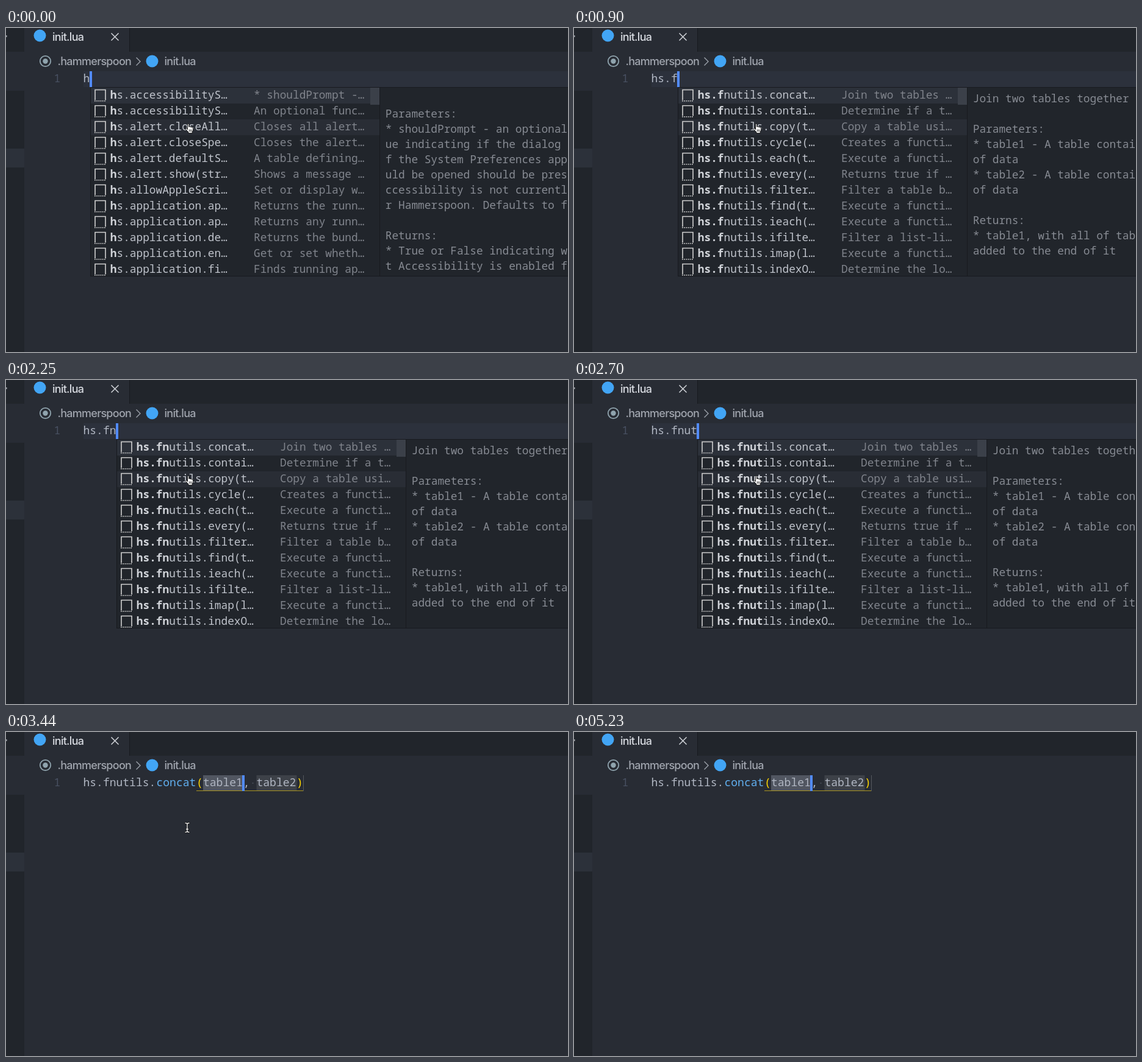
These frames come from a looping animation (921 px wide and 532 px high, 5.38 s). An HTML page:

```html
<!DOCTYPE html>
<html lang="en">
<head>
<meta charset="utf-8">
<title>Editor autocomplete</title>
<style>
  html, body { margin: 0; width: 100%; height: 100%; overflow: hidden; background: #282c34; }
  svg { display: block; width: 921px; height: 532px; }
  text { white-space: pre; }
  .ui { font: 500 18px Inter, sans-serif; letter-spacing: -.73px; fill: #a0a5ae; }
  .code { font: 500 18px "Noto Sans Mono", monospace; fill: #b0b6c2; }
  .label { font: 500 17.8px "Noto Sans Mono", monospace; fill: #bfc3cb; }
  .match { font-weight: 700; fill: #d0d3d8; }
  .detail { font: 500 17.8px "Noto Sans Mono", monospace; fill: #80848c; }
  .doc { font: 500 17.75px "Noto Sans Mono", monospace; fill: #878b93; }
  .paren.matched { fill: #ffd700; }
</style>
</head>
<body>
<svg viewBox="0 0 921 532">
  <defs>
    <clipPath id="popupClip"><rect y="97" width="921" height="311"/></clipPath>
    <g id="snippetIcon" fill="none" stroke="#d0d0d0" stroke-width="1.6">
      <path d="M7 19.500H8V3.500H25V19.500H26"/>
      <path d="M7 21.700H26" stroke-dasharray="1.800 1.400"/>
    </g>
  </defs>

  <rect width="921" height="532" fill="#282c34"/>
  <rect width="921" height="39" fill="#21252b"/>
  <rect y="103" width="30" height="429" fill="#21252b"/>
  <rect y="198" width="30" height="31" fill="#2c313a"/>
  <rect x="30" width="172" height="39" fill="#282c34"/>
  <rect x="202" width="1" height="39" fill="#181a1f"/>
  <rect y="12" width="1.5" height="3" fill="#a0a4ab"/>

  <circle cx="55.5" cy="12.500" r="10" fill="#42a5f5"/>
  <text class="ui" x="76" y="21" style="fill:#d7dae0">init.lua</text>
  <path d="M172.500 8.500l12 12m0-12l-12 12" stroke="#d0d3d8" stroke-width="1.5"/>
  <circle cx="64.500" cy="54.500" r="8.700" fill="none" stroke="#90a4ae" stroke-width="1.8"/>
  <circle cx="64.500" cy="54.500" r="4.200" fill="#90a4ae"/>
  <text class="ui" x="84.500" y="61">.hammerspoon</text>
  <path d="M213.500 48.500l6.500 6.500l-6.500 6.500" fill="none" stroke="#9da2ab" stroke-width="1.4"/>
  <circle cx="239.500" cy="54.500" r="10" fill="#42a5f5"/>
  <text class="ui" x="259.500" y="61">init.lua</text>

  <g id="typing">
    <rect x="127" y="71" width="794" height="26" fill="#2c313c"/>
    <text id="typed" class="code" x="126.500" y="89"></text>
    <g id="popup" clip-path="url(#popupClip)"></g>
  </g>

  <g id="inserted">
    <rect x="323" y="71" width="66" height="25" fill="#515661"/>
    <rect x="410.500" y="71" width="66" height="25" fill="#3d4148"/>
    <rect x="487" y="71" width="1" height="26" fill="#55585e"/>
    <rect id="underline" x="312" y="96" width="175" height="1" fill="#a99420"/>
    <text class="code" y="89"><tspan x="126.500">hs.fnutils.</tspan><tspan x="246.500" fill="#61afef">concat</tspan><tspan class="paren" x="312">(</tspan><tspan x="323">table1</tspan><tspan x="388.500">,</tspan><tspan x="410.500">table2</tspan><tspan class="paren" x="476">)</tspan></text>
    <rect x="403.500" y="83" width="2" height="2" fill="#434852"/>
  </g>
  <text class="code" x="78.500" y="89" style="fill:#495162">1</text>
  <rect id="caret" y="71" width="4" height="26" fill="#528bff"/>

  <g id="hand" transform="translate(293.500 156.500) scale(.9)" stroke="#000" stroke-linejoin="round" stroke-linecap="round">
    <path d="M4.500 11V2.200C4.500.5 7 .5 7 2.200V6.500C7.500 5.300 9.500 5.500 9.500 7C10.200 6 12 6.300 12 7.600C13 7 14.500 7.400 14.500 9V12.500L13 15.500V18H6V16L1.300 11C.5 9.600 2 8.700 3 9.500Z" fill="#fff"/>
    <path d="M7.500 11.500V15M9.500 11.500V15M11.500 11.500V15" stroke-width=".8"/>
  </g>
  <g id="beam" fill="none" stroke-linecap="round">
    <path d="M-3-7.500Q0-7.500 0-5.500Q0-7.500 3-7.500M0-5.500V5.500M-3 7.500Q0 7.500 0 5.500Q0 7.500 3 7.500M-1.500 2.500H1.500" stroke="#111" stroke-width="2.800"/>
    <path d="M-3-7.500Q0-7.500 0-5.500Q0-7.500 3-7.500M0-5.500V5.500M-3 7.500Q0 7.500 0 5.500Q0 7.500 3 7.500M-1.500 2.500H1.500" stroke="#f4f4f4" stroke-width="1.300"/>
  </g>
</svg>

<script>
const LOOP = 5380;
const ACCEPT = 3290;
const COMMAND = 'hs.fnutil';
const $ = id => document.getElementById(id);

const modulesList = {
  items: `accessibilityS|* shouldPrompt -
accessibilityS|An optional func
alert.closeAll|Closes all alert
alert.closeSpe|Closes the alert
alert.defaultS|A table defining
alert.show(str|Shows a message 
allowAppleScri|Set or display w
application.ap|Returns the runn
application.ap|Returns any runn
application.de|Returns the bund
application.en|Get or set wheth
application.fi|Finds running ap`,
  doc: `
Parameters:
* shouldPrompt - an optional boolean
ue indicating if the dialog box asking
f the System Preferences application
uld be opened should be presented
ccessibility is not currently enabled
r Hammerspoon. Defaults to false.

Returns:
* True or False indicating whether
t Accessibility is enabled for`
};
const fnutilsList = {
  items: `fnutils.concat|Join two tables 
fnutils.contai|Determine if a t
fnutils.copy(t|Copy a table usi
fnutils.cycle(|Creates a functi
fnutils.each(t|Execute a functi
fnutils.every(|Returns true if 
fnutils.filter|Filter a table b
fnutils.find(t|Execute a functi
fnutils.ieach(|Execute a functi
fnutils.ifilte|Filter a list-li
fnutils.imap(l|Execute a functi
fnutils.indexO|Determine the lo`,
  doc: `Join two tables together

Parameters:
* table1 - A table containing some
of data
* table2 - A table containing some
of data

Returns:
* table1, with all of table2
added to the end of it`
};

// Index n is the time at which n + 1 characters have been typed.
const keyTimes = [0, 150, 450, 900, 1200, 2400, 2700, 2850, 3000];
const caretOff = [[1650, 2250], [3740, 4190], [4790, 5230]];
const beamStops = [[ACCEPT, 297, 157], [4640, 553, 377], [4790, 833, 469], [4930, 838, 469]];
const BEAM_GONE = 5080;

const rect = (x, y, w, h, fill) =>
  `<rect x="${x}" y="${y}" width="${w}" height="${h}" fill="${fill}"/>`;

function popupMarkup(count) {
  const { items, doc } = count < 4 ? modulesList : fnutilsList;
  const rows = items.split('\n').map((line, i) => {
    const [name, detail] = line.split('|');
    const label = `hs.${name}…`;
    const y = 98 + 26 * i;
    return `<use href="#snippetIcon" y="${y}"/>
      <text class="label" x="32.8" y="${y + 18}"><tspan class="match">${label.slice(0, count)}</tspan>${label.slice(count)}</text>
      <text class="detail" x="268" y="${y + 18}">${detail}…</text>`;
  });
  const docLines = doc.split('\n').map((line, i) =>
    `<text class="doc" x="483.8" y="${122 + 25 * i}">${line}</text>`);
  return rect(0, 97, 920, 311, '#181a1f') +
    rect(1, 98, 473, 309, '#21252b') + rect(475, 98, 445, 309, '#21252b') +
    rect(1, 98, 473, 26, '#2c313a') + rect(1, 150, 473, 26, '#292d35') +
    rect(459, 98, 15, 28, '#3b4049') + rows.join('') + docLines.join('');
}

const popupLeft = index => Math.floor(138 + 10.8 * index);

// One group per typed length, so playback only toggles visibility.
const popups = keyTimes.map((_, i) => {
  const group = document.createElementNS('http://www.w3.org/2000/svg', 'g');
  group.setAttribute('transform', `translate(${popupLeft(i)} 0)`);
  group.innerHTML = popupMarkup(i + 1);
  $('popup').append(group);
  return group;
});

const show = (el, on) => { el.style.display = on ? '' : 'none'; };

function draw(t) {
  const typing = t < ACCEPT;
  const count = keyTimes.filter(k => k <= t).length;
  show($('typing'), typing);
  show($('hand'), typing);
  show($('inserted'), !typing);
  $('typed').textContent = COMMAND.slice(0, count);
  popups.forEach((group, i) => show(group, i === count - 1));

  $('caret').setAttribute('x', typing ? popupLeft(count - 1) - 1 : 387);
  show($('caret'), !caretOff.some(([from, to]) => t >= from && t < to));

  const matched = t >= 3440;
  show($('underline'), matched);
  document.querySelectorAll('.paren').forEach(p => p.classList.toggle('matched', matched));

  const stop = beamStops.filter(([at]) => at <= t).pop();
  show($('beam'), stop && t < BEAM_GONE);
  if (stop) $('beam').setAttribute('transform', `translate(${stop[1]} ${stop[2]})`);
}

const start = performance.now();
function tick() {
  draw((performance.now() - start) % LOOP);
  requestAnimationFrame(tick);
}
tick();
</script>
</body>
</html>
```
